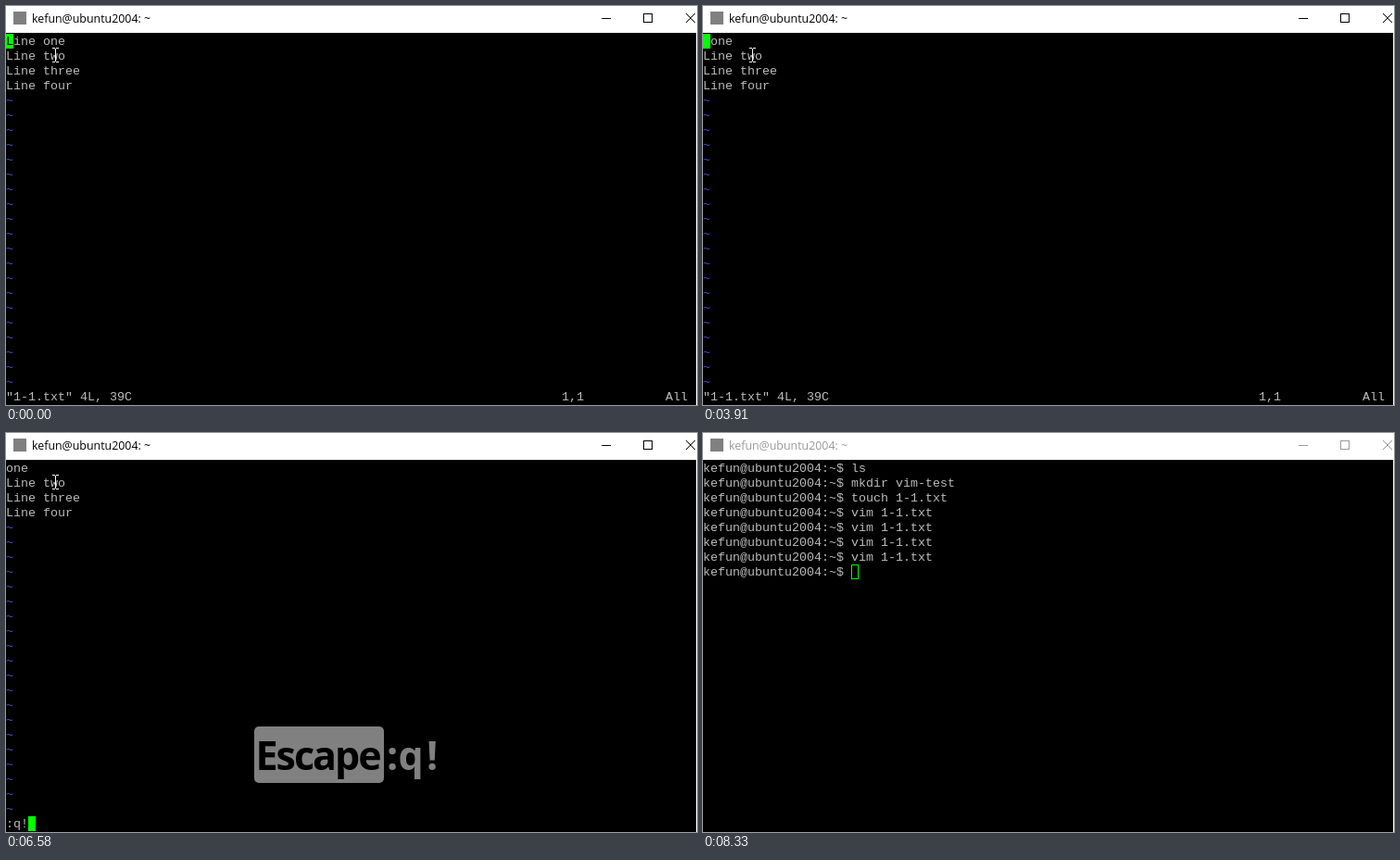
Write an HTML page with a canvas that moves like this. It is 746 px wide and 431 px high and loops after 8430 ms.

```html
<!DOCTYPE html>
<html lang="en">
<head>
<meta charset="utf-8">
<title>Terminal</title>
<style>
html, body { margin: 0; width: 100%; height: 100%; overflow: hidden; background: #000; }
canvas { display: block; }
</style>
</head>
<body>
<canvas id="stage" width="746" height="431"></canvas>
<script>
const ctx = document.getElementById('stage').getContext('2d');
const LOOP = 8430;
const CELL_W = 8, CELL_H = 16, TOP = 30;
const GREY = '#bbbbbb', GREEN = '#00ff00', BLUE = '#4b4bd0';
const MONO = '13.333px "Liberation Mono", monospace';
const TITLE = '12.4px "Open Sans", "Noto Sans", sans-serif';
const KEY_FONT = 'bold 43px "Open Sans", "Noto Sans", sans-serif';
const HOST = 'kefun@ubuntu2004:';
const COMMANDS = ['ls', 'mkdir vim-test', 'touch 1-1.txt',
  'vim 1-1.txt', 'vim 1-1.txt', 'vim 1-1.txt', 'vim 1-1.txt'];

// Each step changes some fields of the state from its time on.
const STEPS = [
  [0, { line: 'Line one', command: null, cursor: true, keys: '', light: 1, pointer: [53, 45],
        shell: false, prompt: false, active: true, pending: '' }],
  [280, { line: 'ine one', keys: 'x' }],
  [900, { keys: '' }],
  [1460, { line: 'ne one', keys: '.' }],
  [1890, { light: 0.85 }],
  [2010, { light: 0.25 }],
  [2160, { line: 'e one', keys: '.x2', light: 1 }],
  [2590, { light: 0.85 }],
  [2740, { keys: '' }],
  [3300, { line: ' one', keys: '.', light: 1 }],
  [3770, { light: 0.65 }],
  [3910, { keys: '' }],
  [4350, { line: 'one', keys: '.x2', light: 1 }],
  [4780, { light: 0.85 }],
  [4920, { keys: '' }],
  [5480, { cursor: false, pending: '^[', keys: 'E', light: 1 }],
  [5630, { command: ':', keys: 'E:' }],
  [6190, { keys: 'E:q' }],
  [6310, { command: ':q' }],
  [6580, { command: ':q!', keys: 'E:q!' }],
  [6860, { shell: true, keys: 'E:q!\n' }],
  [7010, { prompt: true }],
  [7410, { light: 0.25 }],
  [7530, { keys: '' }],
  [7650, { pointer: [110, 110] }],
  [7770, { pointer: [230, 230] }],
  [7890, { pointer: null }],
  [8330, { active: false }]
];

function stateAt(time) {
  const state = {};
  for (const [start, change] of STEPS) if (start <= time) Object.assign(state, change);
  return state;
}

function rect(x, y, w, h, color) {
  ctx.fillStyle = color;
  ctx.fillRect(x, y, w, h);
}

function cells(text, col, row, color) {
  ctx.font = MONO;
  ctx.fillStyle = color;
  ctx.fillText(text, col * CELL_W, TOP + row * CELL_H + 12);
}

function drawCursor(col, row, char = '') {
  rect(col * CELL_W, TOP + row * CELL_H, CELL_W, CELL_H, GREEN);
  cells(char, col, row, '#000');
}

function drawWindow(active) {
  const ink = active ? '#000' : '#999';
  rect(0, 0, 746, 431, '#000');
  rect(0, 0, 746, 29, '#fff');
  rect(745, 29, 1, 402, '#f0f0f0');
  rect(8, 6, 14, 14, '#808080');
  ctx.font = TITLE;
  ctx.fillStyle = ink;
  ctx.fillText(HOST + ' ~', 28, 18);
  rect(643, 13, 10, 1, ink);
  ctx.strokeStyle = ink;
  ctx.lineWidth = 1;
  ctx.strokeRect(688.5, 8.5, 9, 9);
  ctx.beginPath();
  ctx.moveTo(734, 8);
  ctx.lineTo(744, 18);
  ctx.moveTo(744, 8);
  ctx.lineTo(734, 18);
  ctx.stroke();
}

function drawEditor(s) {
  [s.line, 'Line two', 'Line three', 'Line four'].forEach((text, i) => cells(text, 0, i, GREY));
  for (let row = 4; row < 24; row++) cells('~', 0, row, BLUE);
  if (s.command !== null) {
    cells(s.command, 0, 24, GREY);
    drawCursor(s.command.length, 24);
    return;
  }
  cells('"1-1.txt" 4L, 39C', 0, 24, GREY);
  cells(s.pending, 65, 24, GREY);
  cells('1,1', 75, 24, GREY);
  cells('All', 89, 24, GREY);
  if (s.cursor) drawCursor(0, 0, s.line[0]);
}

function drawShell(s) {
  const prompt = HOST + '~$ ';
  const last = COMMANDS.length;
  COMMANDS.forEach((text, row) => cells(prompt + text, 0, row, GREY));
  if (s.prompt) cells(prompt, 0, last, GREY);
  const col = s.prompt ? prompt.length : 0;
  if (s.active) {
    drawCursor(col, last);
  } else {
    ctx.strokeStyle = GREEN;
    ctx.strokeRect(col * CELL_W + 0.5, TOP + last * CELL_H + 0.5, CELL_W - 1, CELL_H - 1);
  }
}

function keyBox(x, w, color) {
  ctx.fillStyle = color;
  ctx.beginPath();
  ctx.roundRect(x, 317, w, 61, 5);
  ctx.fill();
}

function keyText(text, x, y, color) {
  ctx.font = KEY_FONT;
  ctx.fillStyle = color;
  ctx.fillText(text, x, y);
}

function drawReturnArrow() {
  ctx.strokeStyle = '#000';
  ctx.lineWidth = 3;
  ctx.beginPath();
  ctx.moveTo(491.5, 344);
  ctx.lineTo(491.5, 355.5);
  ctx.lineTo(482, 355.5);
  ctx.stroke();
  ctx.fillStyle = '#000';
  ctx.beginPath();
  ctx.moveTo(478, 355.5);
  ctx.lineTo(485, 349);
  ctx.lineTo(485, 362);
  ctx.fill();
}

// Fading dims the grey only; lettering on the key boxes stays black.
function drawKeys(keys, light) {
  const level = Math.round(128 * light);
  const color = `rgb(${level}, ${level}, ${level})`;
  if (keys[0] === 'E') {
    keyBox(268, 140, color);
    ctx.letterSpacing = '-2px';
    keyText('Escape', 269.5, 364, '#000');
    ctx.letterSpacing = '0px';
    const places = { ':': 411, q: 423.5, '!': 454 };
    for (const key of keys) if (key in places) keyText(key, places[key], 364, color);
    if (keys.endsWith('\n')) {
      keyBox(472, 27, color);
      drawReturnArrow();
    }
  } else if (keys === 'x') {
    keyText('x', 266, 356, color);
  } else {
    const places = { '.': 266, x: 291, 2: 327 };
    for (const key of keys) keyText(key, places[key], 356, color);
  }
}

function drawPointer([x, y]) {
  for (const dy of [0, 15]) {
    rect(x - 3, y + dy, 3, 1, '#fff');
    rect(x + 1, y + dy, 3, 1, '#fff');
  }
  rect(x, y + 1, 1, 14, '#fff');
}

function draw(now) {
  const s = stateAt(now % LOOP);
  drawWindow(s.active);
  if (s.shell) drawShell(s);
  else drawEditor(s);
  drawKeys(s.keys, s.light);
  if (s.pointer) drawPointer(s.pointer);
}

const begin = performance.now();
function tick() {
  draw(performance.now() - begin);
  requestAnimationFrame(tick);
}
tick();
</script>
</body>
</html>
```
